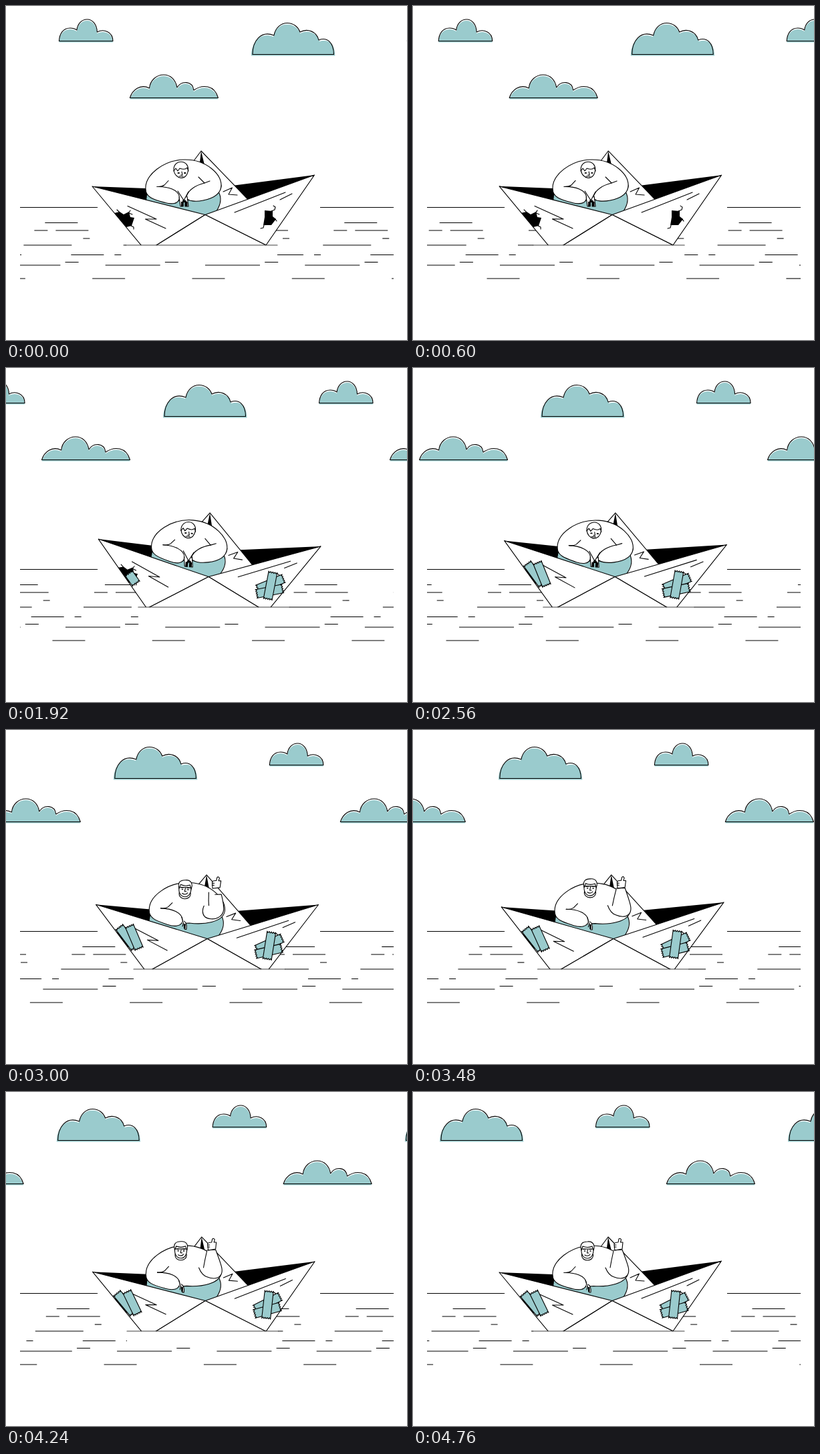
An HTML page that plays this animation: 600 px wide and 500 px high, repeating every 4800 ms.

```html
<!DOCTYPE html>
<html>
<head>
<meta charset="utf-8">
<style>
  html, body { margin: 0; width: 100%; height: 100%; overflow: hidden; background: #fff; }
  svg { display: block; }
  .ink { fill: none; stroke: #000; stroke-width: 1.1; stroke-linejoin: round; stroke-linecap: round; }
  .white { fill: #fff; }
  .teal { fill: #9acbcd; }
  .black { fill: #000; stroke: none; }
</style>
</head>
<body>
<svg width="600" height="500" viewBox="0 0 600 500">
  <defs>
    <clipPath id="aboveWater"><path d="M0 0H600V358H0Z"/></clipPath>
    <path id="small" d="M79.500 52.500C80 42 85 33 96 33Q102 33 106 36C107 27 113 20 121.500 20C130 20 136 28 136.500 39C146 34 160 38 160 52.500Z"/>
    <path id="large" d="M369 72.500C369 53 381 36 401 44C403 33 411 25.500 421 25.500C430 25.500 437 31 440 39C451 33 465 38 468 51C481 46 490.500 55 490.500 72.500Z"/>
    <path id="wide" d="M185.500 137.500C189 126 201 116 214.500 123C216 111 225 103 236 103C247 103 254 111 256 122C263 111 279 112 281 126C294 117 312 118 317.500 137.500Z"/>
  </defs>

  <g id="clouds">
    <g id="cloudSet">
      <g class="teal">
        <use href="#small" y="2"/>
        <use href="#large" transform="translate(-13.300 2) scale(1.031 1)"/>
        <use href="#wide" y="2"/>
      </g>
      <g class="ink"><use href="#small"/><use href="#large"/><use href="#wide"/></g>
    </g>
    <use href="#cloudSet" x="521"/>
  </g>

  <g id="rows" class="ink" style="stroke-linecap:butt">
    <path d="M21 301.500H137M470 301.500H580"/>
  </g>
  <path id="shade" class="white" d="M180 357H406V378H180Z"/>

  <g clip-path="url(#aboveWater)">
    <g id="boat" class="ink">
      <path class="black" d="M129 270L222 273.500V294Z"/>
      <path class="black" d="M461.500 253L342 268.500L361 290Z"/>
      <path class="white" d="M362 289.500L292 217L280 233L285 300"/>
      <path class="black" d="M292 217L290 233.500L297 238Z"/>
      <path d="M325 278L338.500 272L333 282L346 283"/>

      <path class="teal" stroke="none" d="M211 283L258 288L318 277Q324 291 315 307L298 314L210 292Z"/>
      <path d="M318 278Q325 291 315.500 306"/>
      <path class="white" d="M209 275C207 253 236 230 268 230C300 230 323 252 322 270C320 287 292 292 270 290.500L240 293Z"/>
      <path id="armRight" class="white"/>
      <path id="elbowRight"/>
      <path class="white" d="M226 270.500C242 270 259 275 259.500 287C259 297 247 297 238 294.500C222 290 209 287 209 274"/>
      <path d="M243 261.500L237 268Q233 271 226 270.500"/>

      <g id="handsDown">
        <path class="white" d="M257 277L266 291L273 278M259 286L261 300H265V291M271 285L273 300H268V291"/>
        <path class="black" d="M262 293H265.500V300H262ZM268 293H271.500V300H268ZM264 291.500H270V294H264Z"/>
      </g>
      <g id="handsUp">
        <path class="white" d="M258 282L261 291L260 296M262 288Q267 291 266 300H263.500L262 293"/>
        <path class="black" d="M262 292H264.500V299H262Z"/>
        <path class="white" d="M302 237L301 228Q301 225 307 225L308 220Q310 218 311.500 221L310.500 225H314L313 235Z"/>
        <path d="M301 229H304M301 232H304"/>
      </g>

      <g id="headDown">
        <path class="white" d="M251 246C250 229 274 229 272.500 246Q271 257 262 257.500Q253 256 251 246Z"/>
        <path d="M251 247L254 243L257 247L260 243Q268 246 271 242L273 247M263 248L264 253H261.500M259 255H265"/>
        <path d="M257.500 250H259M267 250H268.500" stroke-width="1.800"/>
      </g>
      <g id="headUp">
        <path class="white" d="M252.500 243C251 255 271 255 269.500 243"/>
        <path class="white" d="M252 235C251 243 255 249 261 249C267 249 270.500 243 270 235Z"/>
        <path class="white" d="M252 237C249 228 253 224 261 224C269 223 273 229 270 237L268 231Q261 234 254 231Z"/>
        <path d="M261.500 236L260.500 241H263M257 244Q262 247 265 243M255 235.500H258M264 235.500H267"/>
        <path d="M256.500 238H257.500M265 238H266" stroke-width="1.600"/>
      </g>

      <path class="white" d="M129 270L298 312.500L461.500 253L389 358L298 312.500L210 367.500Z"/>
      <path class="white" d="M210 367.500L298 312.500L389 358L380 400H215"/>
      <path d="M182 299.500L225 319H208.500L239 333M342 309L418 279M410 290L428 281"/>

      <path class="black" d="M162 310L170 308L176 312L184 308L186 316L192 317L188 329L180 331Z"/>
      <path d="M170 309L166 305M184 309L186 306M184 310L189 312M187 329L191 331L191 334"/>
      <path class="black" d="M387 306L399 307L399 315L404 319L397 328L385 328L387 316Z"/>
      <path d="M397 307L402 305L403 301L400 299M386 328L385 332L381 333M403 319L405 322"/>
      <g id="tapes"></g>
    </g>
  </g>
  <path id="waterline" class="ink" stroke-opacity=".75" d="M180 358H406"/>
</svg>
<script>
const LOOP = 4800, TILE = 149.3;
const $ = id => document.getElementById(id);
const clamp = x => Math.min(1, Math.max(0, x));
const ease = x => (1 - Math.cos(Math.PI * clamp(x))) / 2;

function addPath(parent, attrs) {
  const path = document.createElementNS('http://www.w3.org/2000/svg', 'path');
  for (const key in attrs) path.setAttribute(key, attrs[key]);
  return parent.appendChild(path);
}

// y, first dash position, dash and gap lengths
const rows = [
  [324.5, 58.4, 49], [336, 42.4, 20, 12, 49], [348, 115.4, 10], [358, 26.4, 72],
  [372.5, 97.4, 49, 16, 10], [383.5, 88.6, 20], [388, -0.6, 82], [408, 129.2, 49]
].map(([y, x, ...dashes]) => {
  const rest = TILE - dashes.reduce((a, b) => a + b);
  const path = addPath($('rows'), { d: `M21 ${y}H580`, 'stroke-dasharray': [...dashes, rest] });
  return { path, x };
});

// start point, angle and length, in the order they are stuck on
const tapes = [
  [372, 325, -27, 43], [371, 332, -16, 41], [389, 339, -84, 42],
  [191, 332, -130, 40], [197, 333, -116, 38]
].map(([x, y, angle, length]) => ({
  length,
  path: addPath($('tapes'), { class: 'teal', transform: `translate(${x} ${y}) rotate(${angle})` })
}));

function tapeShape(length) {
  if (length < 3) return '';
  const near = [], far = [];
  for (let i = 0; i <= 8; i++) {
    const tooth = i % 2 * 2, y = -6.5 + i * 13 / 8;
    near.push([tooth, y]);
    far.unshift([length - tooth, y]);
  }
  return 'M' + [...near, ...far].join('L') + 'Z';
}

// Blends two paths that have the same commands
function morph(from, to, p) {
  const ends = to.match(/[\d.]+/g);
  let i = 0;
  return from.replace(/[\d.]+/g, n => +n + (ends[i++] - n) * p);
}

const ARM = [
  'M297 265C285 268 272 275 270 286C271 293 285 293 295 291C310 288 322 282 322 268L322 268',
  'M288 263C290 268 294 275 301 277C307 279.5 315 280 319 276C326 270 323 262 313 236L300 237'
];
const ELBOW = ['M288 256L297 265L305 262', 'M300 238L297 252L295 263'];

function move(id, x, y = 0) {
  $(id).setAttribute('transform', `translate(${x} ${y})`);
}

function show(id, visible) {
  $(id).setAttribute('visibility', visible ? 'visible' : 'hidden');
}

function draw() {
  const t = performance.now() % LOOP;

  move('clouds', -0.0687 * t);
  for (const { path, x } of rows)
    path.setAttribute('stroke-dashoffset', 21 - x + TILE * t / LOOP);

  const sway = t < 1740 ? ease((t - 520) / 1220) : 1 - ease((t - 1740) / 2940);
  $('boat').setAttribute('transform', `rotate(${4.83 * sway} 300 374)`);
  move('shade', 18 * sway);
  move('waterline', 18 * sway);

  tapes.forEach(({ path, length }, i) =>
    path.setAttribute('d', tapeShape(length * clamp((t - 1080 - 240 * i) / 240))));

  const lift = ease((t - 2640) / 560), up = lift > 0.5;
  $('armRight').setAttribute('d', morph(...ARM, lift));
  $('elbowRight').setAttribute('d', morph(...ELBOW, lift));
  move('headDown', 0, -9 * lift);
  move('headUp', 0, 9 * (1 - lift));
  show('headDown', !up);
  show('handsDown', !up);
  show('headUp', up);
  show('handsUp', up);

  requestAnimationFrame(draw);
}
draw();
</script>
</body>
</html>
```
